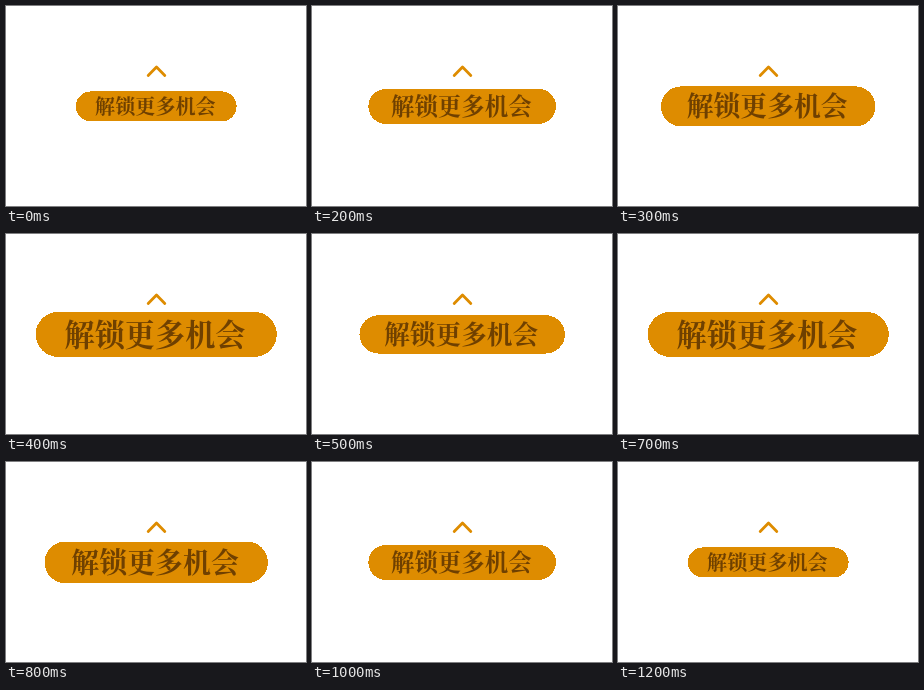
Write an HTML page that moves like this. It is 300 by 200 pixels and loops after 1.3 s.

```html
<!DOCTYPE html>
<html lang="zh-CN">
<head>
<meta charset="utf-8">
<style>
  html, body { margin: 0; width: 100%; height: 100%; overflow: hidden; background: #fff; }
  svg { display: block; }
  text {
    font: 700 20.1px "Noto Serif CJK SC", "Noto Serif SC", "Noto Sans CJK SC", "Noto Sans CJK", serif;
    text-anchor: middle;
    fill: #6f4000;
  }
</style>
</head>
<body>
<svg width="300" height="200" viewBox="0 0 300 200">
  <path d="M142.2 69.5 L150.5 61 L158.8 69.5" fill="none" stroke="#de8c00"
        stroke-width="2.8" stroke-linecap="round" stroke-linejoin="round"/>
  <g id="button">
    <rect x="-80.4" y="-15" width="160.8" height="30" rx="15" fill="#de8c00" shape-rendering="crispEdges"/>
    <text x="-.8" y="7.4">解锁更多机会</text>
  </g>
</svg>
<script>
  const STEP = 100;
  // Growth per step, in ninths of the full half-size increase
  const growth = [0, 1, 3, 6, 9, 5, 7, 9, 7, 5, 3, 1, 0];
  const button = document.getElementById("button");
  const start = performance.now();

  function draw() {
    const step = Math.floor((performance.now() - start) / STEP) % growth.length;
    const scale = 1 + growth[step] / 18;
    button.setAttribute("transform", `translate(150.2 100.4) scale(${scale})`);
    requestAnimationFrame(draw);
  }
  draw();
</script>
</body>
</html>
```
